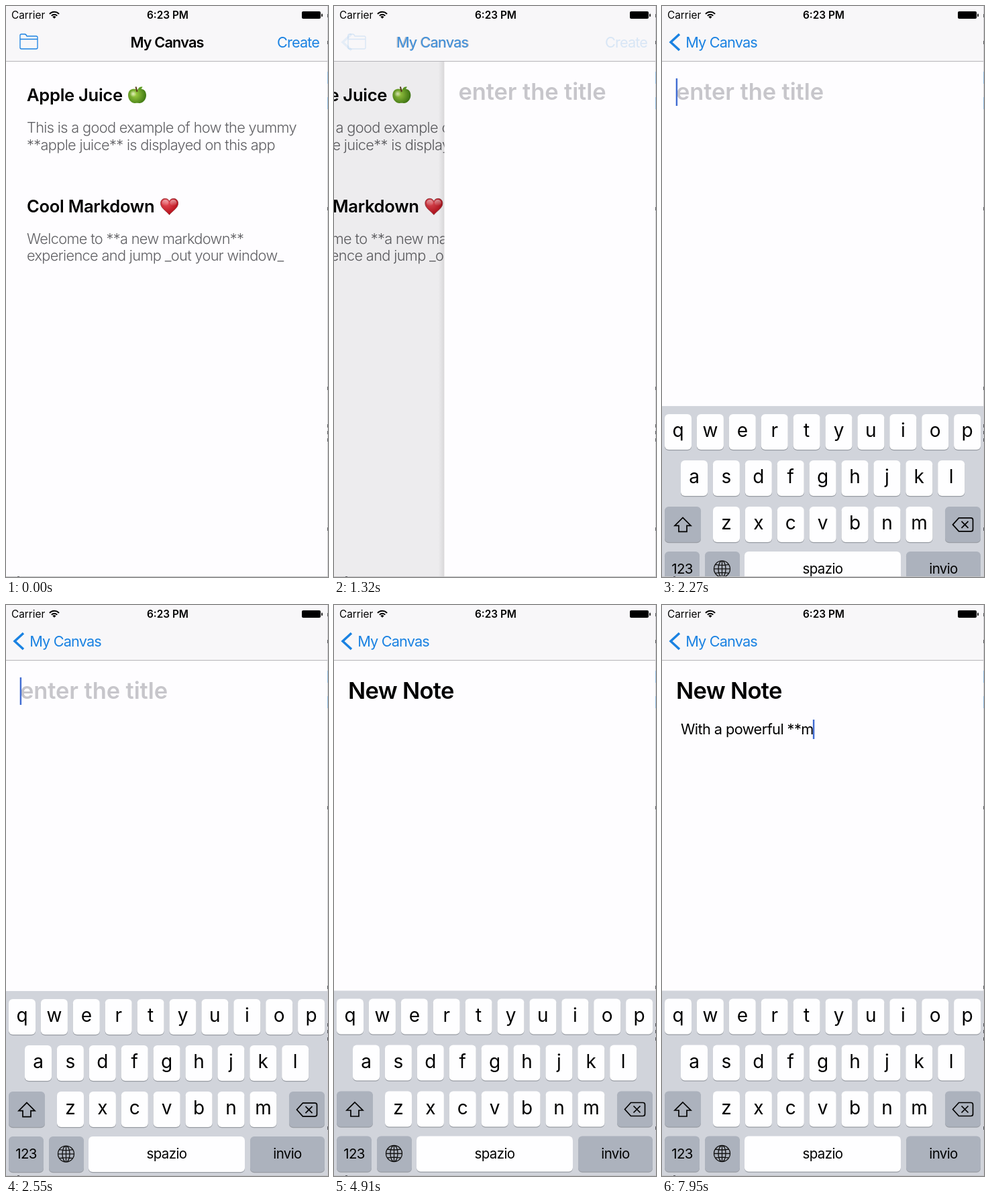
Recreate the animation shown at these times as an HTML page with a canvas. Size 480 px wide and 852 px high, loop 8 s.

```html
<!DOCTYPE html>
<html lang="en">
<head>
<meta charset="utf-8">
<title>Notes app</title>
<style>
html, body { margin: 0; width: 100%; height: 100%; overflow: hidden; background: #fefdff; }
canvas { display: block; width: 100vw; height: 100vh; }
</style>
</head>
<body>
<canvas id="stage" width="480" height="852"></canvas>
<script>
const W = 480, H = 852, LOOP = 8000;
const ctx = document.getElementById('stage').getContext('2d');
const BLUE = '#1a82e2', PAPER = '#fefdff', BAR = '#f8f7f9';
const PUSH_AT = 1174, KEYS_AT = 1996, BODY_AT = 4200;
const KEYS_H = 276.5;
const TITLE = { text: 'New Note', start: 2560, step: 145 };
const BODY = { text: 'With a powerful **markdown**', start: 5000, step: 160 };

const APPLE = new Path2D('M0-8C4-10.5 13.5-10 13.5 0C13.5 8 7 12.5 3 12C1 11.5-1 11.5-3 12C-7 12.5-13.5 8-13.5 0C-13.5-10-4-10.5 0-8Z');
const LEAF = new Path2D('M1-8C2-12 5-13 8-12.5C7-9 4-7.5 1-8Z');
const HEART = new Path2D('M0-7C2-13 13-13 13-4C13 3 5 7 0 13C-5 7-13 3-13-4C-13-13-2-13 0-7Z');
const FOLDER = new Path2D('M21 62V44Q21 42 23 42H28Q30 42 31 45H45Q47 45 47 47V62Q47 64 45 64H23Q21 64 21 62M21 49.5H47');
const SHIFT = new Path2D('M0-11L12 1H6V10H-6V1H-12Z');
const DELETE = new Path2D('M-15 0L-6-10H12Q15-10 15-7V7Q15 10 12 10H-6ZM-2-5L8 5M8-5L-2 5');

// Critically damped spring, 0 to 1
function spring(ms) {
  const x = Math.max(0, ms) * 0.0153;
  return 1 - (1 + x) * Math.exp(-x);
}

function text(str, x, y, { size = 21.76, weight = 400, color = '#000', track = -0.03, align = 'left' } = {}) {
  ctx.font = `${weight} ${size}px Inter, sans-serif`;
  ctx.letterSpacing = `${track * size}px`;
  ctx.fillStyle = color;
  ctx.textAlign = align;
  ctx.fillText(str, x, y);
  return ctx.measureText(str).width;
}

function rect(x, y, w, h, color) {
  ctx.fillStyle = color;
  ctx.fillRect(x, y, w, h);
}

function round(x, y, w, h, r, color) {
  ctx.fillStyle = color;
  ctx.beginPath();
  ctx.roundRect(x, y, w, h, r);
  ctx.fill();
}

function stroke(path, color, width) {
  ctx.strokeStyle = color;
  ctx.lineWidth = width;
  path ? ctx.stroke(path) : ctx.stroke();
}

function at(x, y, draw) {
  ctx.save();
  ctx.translate(x, y);
  draw();
  ctx.restore();
}

function faded(alpha, draw) {
  if (alpha <= 0) return;
  ctx.save();
  ctx.globalAlpha = Math.min(1, alpha);
  draw();
  ctx.restore();
}

function glow(x, y, r, inner, outer) {
  const g = ctx.createRadialGradient(x, y, 0, x, y, r);
  g.addColorStop(0, inner);
  g.addColorStop(1, outer);
  return g;
}

function apple() {
  ctx.fillStyle = glow(-3, -1, 17, '#a3d244', '#3a7410');
  ctx.fill(APPLE);
  ctx.fillStyle = glow(-6, -2, 5, 'rgba(255,255,235,.75)', 'rgba(255,255,235,0)');
  ctx.fill(APPLE);
  ctx.beginPath();
  ctx.moveTo(0, -5);
  ctx.quadraticCurveTo(-1, -9, -2, -12.5);
  stroke(null, '#5a3a1c', 2);
  ctx.fillStyle = '#5d9c24';
  ctx.fill(LEAF);
}

function heart() {
  ctx.fillStyle = glow(-4, -5, 18, '#e8505a', '#b40d18');
  ctx.fill(HEART);
  stroke(HEART, '#8d3138', 0.8);
  const g = ctx.createLinearGradient(0, -11, 0, 0);
  g.addColorStop(0, 'rgba(255,255,255,.6)');
  g.addColorStop(1, 'rgba(255,255,255,0)');
  ctx.fillStyle = g;
  ctx.beginPath();
  ctx.ellipse(-6, -5, 5, 4.5, 0, 0, 7);
  ctx.ellipse(6, -5, 5, 4.5, 0, 0, 7);
  ctx.fill();
}

function note(y, heading, lines, iconX, icon) {
  text(heading, 31, y, { size: 25.6, weight: 600, track: -0.012 });
  at(iconX, y - 9, icon);
  lines.forEach((line, i) =>
    text(line, 31, y + 47 + i * 25.5, { weight: 300, color: '#5f5f63' }));
}

function listView() {
  note(142, 'Apple Juice', ['This is a good example of how the yummy',
    '**apple juice** is displayed on this app'], 195.5, apple);
  note(307.5, 'Cool Markdown', ['Welcome to **a new markdown**',
    'experience and jump _out your window_'], 243.5, heart);
}

function typed({ text, start, step }, t) {
  return text.slice(0, t < start ? 0 : Math.floor((t - start) / step) + 1);
}

// The caret stays lit while typing, then blinks
function caretOn(t, focus, { text, start, step }) {
  const end = start + (text.length - 1) * step;
  const since = t < start ? t - focus : t < end ? 0 : t - end;
  return since % 1000 < 600;
}

function editorView(t) {
  const title = typed(TITLE, t), body = typed(BODY, t);
  const style = { size: 34.5, weight: 600, track: -0.02 };
  const titleW = title ? text(title, 21, 140, style) : 0;
  if (!title) text('enter the title', 21, 140, { ...style, track: -0.003, color: '#c7c6cb' });
  const bodyW = body ? text(body, 28, 193, { track: -0.027 }) : 0;
  if (t < KEYS_AT) return;
  if (t < BODY_AT) {
    if (caretOn(t, KEYS_AT, TITLE)) rect(20.7 + titleW, 108, 2.4, 41, '#416cd2');
  } else if (caretOn(t, BODY_AT, BODY)) {
    rect(27.2 + bodyW, 171, 2.4, 29, '#416cd2');
  }
}

function statusBar() {
  const style = { size: 15.36, track: 0 };
  text('Carrier', 8, 19, style);
  text('6:23 PM', 241, 19, { ...style, weight: 600, align: 'center' });
  ctx.lineCap = 'butt';
  for (const r of [5.7, 9.7]) {
    ctx.beginPath();
    ctx.arc(72, 18.5, r, -Math.PI * 0.76, -Math.PI * 0.24);
    stroke(null, '#000', 2);
  }
  ctx.beginPath();
  ctx.moveTo(72, 18.8);
  ctx.arc(72, 18.8, 3.6, -Math.PI * 0.76, -Math.PI * 0.24);
  ctx.fill();
  round(441, 8, 28, 11, 2, '#000');
  round(470, 11.5, 2, 4.5, 1, '#222');
}

function navBar(p) {
  rect(0, 0, W, 82, BAR);
  rect(0, 82, W, 1, '#b5b4b8');
  statusBar();

  faded(Math.pow(1 - p, 1.8), () => {
    stroke(FOLDER, BLUE, 1.3);
    text('Create', 404, 62, { color: BLUE, track: -0.04 });
  });
  const mid = 240 - 151.5 * Math.pow(p, 1.15);
  const style = { align: 'center', track: -0.04 };
  faded(1 - p * 1.2, () => text('My Canvas', mid, 62, { ...style, weight: 600 }));
  faded(p * 1.2, () => text('My Canvas', mid, 62, { ...style, color: BLUE }));
  faded((p - 0.63) * 3, () => {
    ctx.beginPath();
    ctx.moveTo(26, 42);
    ctx.lineTo(13, 54);
    ctx.lineTo(26, 66);
    stroke(null, BLUE, 3.5);
  });
}

function key(x, y, w, label, dark, size = 28) {
  round(x, y + 1.3, w, 53, 6, '#999da4');
  round(x, y, w, 53, 6, dark ? '#acb2bd' : '#fefeff');
  if (!label) return;
  const big = size === 28;
  text(label, x + w / 2, y + (big ? 34 : 33), { size, align: 'center', track: big ? 0 : -0.03 });
}

function globe() {
  ctx.beginPath();
  ctx.arc(0, 0, 12, 0, 7);
  ctx.moveTo(5.5, 0);
  ctx.ellipse(0, 0, 5.5, 12, 0, 0, 7);
  ctx.moveTo(-12, 0);
  ctx.lineTo(12, 0);
  ctx.moveTo(0, -12);
  ctx.lineTo(0, 12);
  for (const s of [-1, 1]) {
    ctx.moveTo(-10, s * 6.5);
    ctx.quadraticCurveTo(0, s * 4.5, 10, s * 6.5);
  }
  stroke(null, '#111', 1.3);
}

function keyboard() {
  rect(0, 0, W, KEYS_H + 1, '#d1d4db');
  const row = (letters, x, y) =>
    [...letters].forEach((c, i) => key(x + i * 47.9, y, 40, c));
  row('qwertyuiop', 4, 12);
  row('asdfghjkl', 28, 81);
  row('zxcvbnm', 76, 150);
  key(4, 150, 54, '', true);
  key(422, 150, 53, '', true);
  key(4, 217, 52, '123', true, 20.48);
  key(64, 217, 52, '', true);
  key(123, 217, 233, 'spazio', false, 20.48);
  key(364, 217, 111, 'invio', true, 20.48);
  at(31, 177.5, () => stroke(SHIFT, '#000', 1.7));
  at(448.5, 177, () => stroke(DELETE, '#000', 1.7));
  at(89.5, 243, globe);
}

function screenEdge() {
  rect(479, 0, 1, H, '#cfced2');
  rect(0, 851, W, 1, '#c4c4c6');
  rect(479, 98, 1, 18, '#8fb8dc');
  rect(479, 136, 1, 18, '#8fb8dc');
  for (const y of [12, 52, 300, 568, 624, 634, 645, 778]) rect(479, y, 1, 5, '#55555a');
  rect(17, 851, 3, 1, '#55555a');
}

function draw(t) {
  const p = spring(t - PUSH_AT);
  const edge = W * (1 - p);
  ctx.lineJoin = 'miter';
  rect(0, 0, W, H, PAPER);

  if (edge > 0.5) {
    at(-144 * p, 0, listView);
    if (p > 0) {
      rect(0, 82, W, H, `rgba(0,0,0,${0.1 * p})`);
      const g = ctx.createLinearGradient(edge - 9, 0, edge, 0);
      g.addColorStop(0, 'rgba(0,0,0,0)');
      g.addColorStop(1, 'rgba(0,0,0,.09)');
      rect(edge - 9, 82, 9, H, g);
    }
  }
  if (p > 0) {
    rect(edge, 82, W, H, PAPER);
    at(edge, 0, () => editorView(t));
  }
  navBar(p);
  const up = spring(t - KEYS_AT);
  if (up > 0) at(0, H - KEYS_H * up, keyboard);
  screenEdge();
}

function tick() {
  draw(performance.now() % LOOP);
  requestAnimationFrame(tick);
}
tick();
</script>
</body>
</html>
```
